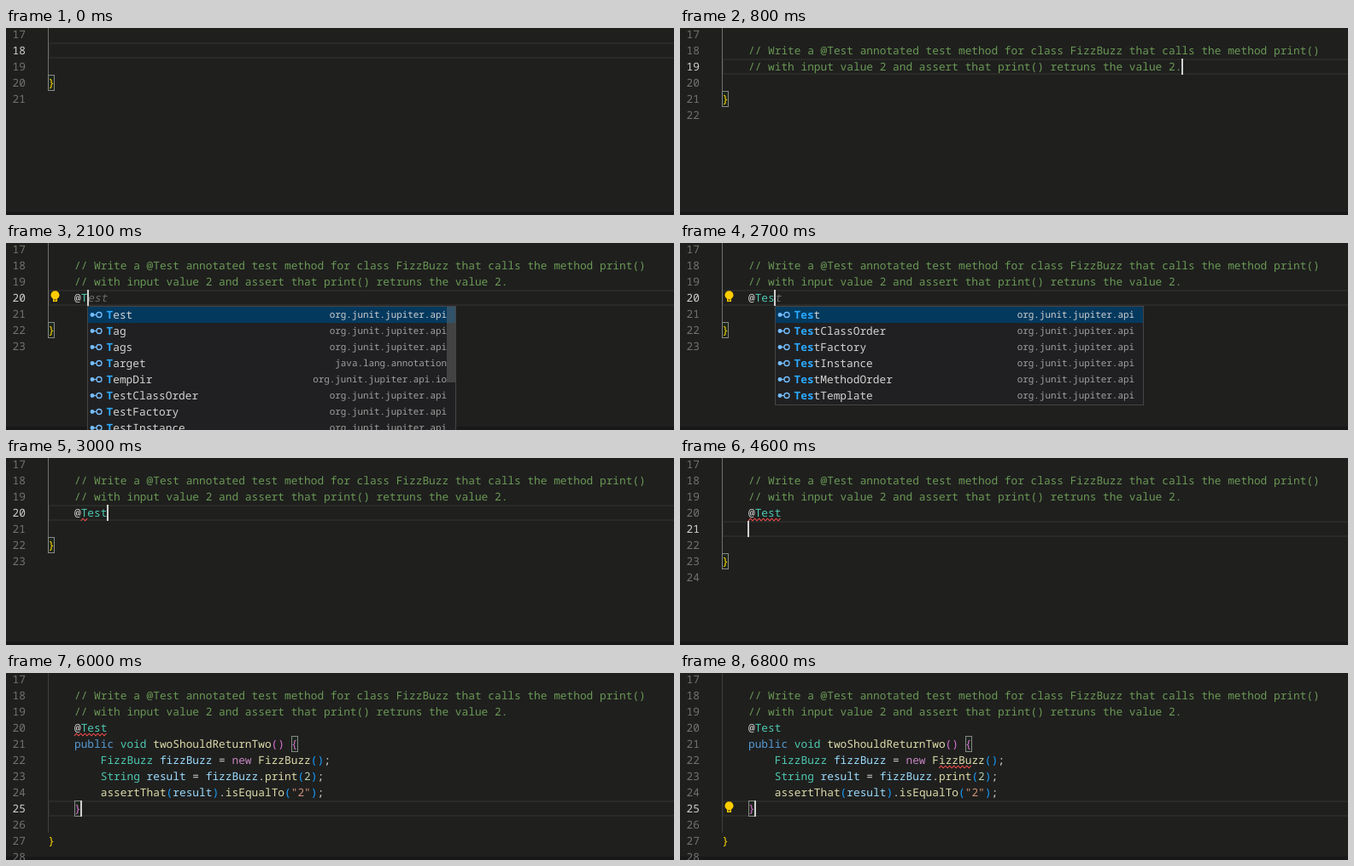
Animation, 782 px wide and 220 px high, one loop 6.9 s. Source, as an HTML page:

```html
<!DOCTYPE html>
<html lang="en">
<head>
<meta charset="utf-8">
<title>Code editor</title>
<style>
html, body { margin: 0; width: 100%; height: 100%; overflow: hidden; background: #1f1f1e; }
svg { display: block; width: 782px; height: 220px; }
text {
  font: 12.828px "Noto Sans Mono", "DejaVu Sans Mono", monospace;
  white-space: pre;
  text-rendering: geometricPrecision;
  fill: #d4d4d4;
}
.num { fill: #6e7681; fill: #72726f; text-anchor: end; }
.num.on { fill: #d0d0d0; }
.c { fill: #6a9955; }
.t { fill: #4ec9b0; }
.k { fill: #569cd6; }
.n { fill: #c586c0; }
.f { fill: #dcdcaa; }
.v { fill: #9cdcfe; }
.d { fill: #b5cea8; }
.s { fill: #ce9178; }
.y { fill: #ffd700; }
.p { fill: #da70d6; }
.b { fill: #179fff; }
.g { fill: #6c6c6a; font-style: italic; }
.hit { fill: #2aaaff; font-weight: bold; }
.pkg { font-size: 10.9px; fill: #a0a0a0; text-anchor: end; }
.pkg.on { fill: #d0d0d0; }
.wave { fill: none; stroke: #f14c4c; stroke-width: 1.1; }
</style>
</head>
<body>
<svg id="stage" viewBox="0 0 782 220"></svg>
<script>
const LOOP = 6900, ROW = 19, CHAR = 7.697;
const stage = document.getElementById("stage");
const colX = col => 49.2 + col * CHAR;
const rowY = row => 17 + row * ROW;          // row 0 is line 18

// Code markup: runs split by "|", the first letter of a run is its colour class.
const paint = code => code.split("|")
  .map(run => `<tspan class="${run[0]}">${run.slice(1)}</tspan>`).join("");
const rect = (x, y, w, h, style) =>
  `<rect x="${x}" y="${y}" width="${w}" height="${h}" ${style}/>`;
const text = (x, y, body, cls = "") => `<text x="${x}" y="${y}" class="${cls}">${body}</text>`;

const comments = [
  "c    // Write a @Test annotated test method for class FizzBuzz that calls the method print()",
  "c    // with input value 2 and assert that print() retruns the value 2."
];
const tag = name => "w    @|t" + name;
const method = [
  "k    public |tvoid |ftwoShouldReturnTwo|p() {",
  "t        FizzBuzz |vfizzBuzz |w= |nnew |fFizzBuzz|b()|w;",
  "t        String |vresult |w= |vfizzBuzz|w.|fprint|b(|d2|b)|w;",
  "f        assertThat|b(|vresult|b)|w.|fisEqualTo|b(|s\"2\"|b)|w;",
  "p    }"
];
const plain = line => line.split("|").map(run => run.slice(1)).join("");
const ghost = method.map(line => "g" + plain(line));
const flat = method.map(line => "w" + plain(line));
const body = (...lines) => [...comments, ...lines, ""];

const api = "org.junit.jupiter.api";
const inApi = names => names.split(" ").map(name => [name, api]);
const general = inApi("AfterAll AfterEach BeforeAll BeforeEach Disabled DisplayName Nested Order");
const tNames = [
  ...inApi("Test Tag Tags"),
  ["Target", "java.lang.annotation"],
  ["TempDir", api + ".io"],
  ...inApi("TestClassOrder TestFactory TestInstance TestMethodOrder TestTemplate")
];
const popup = (col, typed) => ({
  col, typed, items: typed ? tNames.filter(([name]) => name.startsWith(typed)) : general
});

// Each step changes part of the editor state from its time on.
const steps = [
  [0, { lines: ["", ""], row: 0, col: 4, cursor: false, bulb: null, popup: null, wave: null, done: false }],
  [400, { cursor: true }],
  [800, { lines: [...comments, ""], row: 1, col: 70 }],
  [1000, { bulb: 1 }],
  [1100, { cursor: false }],
  [1300, { lines: body(""), row: 2, col: 4, cursor: true }],
  [1500, { bulb: null }],
  [1700, { lines: body("w    @|gTest"), col: 5 }],
  [1800, { popup: popup(5, "") }],
  [2000, { lines: body("w    @|tT|gest"), col: 6, popup: popup(6, "T") }],
  [2100, { bulb: 2 }],
  [2600, { lines: body("w    @|tTe|gst"), col: 7, popup: popup(7, "Te") }],
  [2700, { lines: body("w    @|tTes|gt"), col: 8, popup: popup(8, "Tes") }],
  [2800, { lines: body(tag("Test")), col: 9, popup: popup(8, "Test") }],
  [3000, { popup: null, bulb: null, wave: [2, 5, 6] }],
  [3300, { bulb: 2 }],
  [3500, { lines: body(tag("Test"), ""), row: 3, col: 4 }],
  [3800, { bulb: null }],
  [4000, { wave: [2, 4, 9], cursor: false }],
  [4500, { cursor: true }],
  [4700, { lines: body(tag("Test"), ...ghost) }],
  [5000, { cursor: false }],
  [5500, { cursor: true }],
  [5800, { lines: body(tag("Test"), ...flat), row: 7, col: 5, done: true }],
  [5900, { lines: body(tag("Test"), ...method) }],
  [6100, { bulb: 7 }],
  [6200, { wave: [4, 33, 38] }],
  [6300, { cursor: false }],
  [6800, { cursor: true }]
];
let current = {};
const states = steps.map(([, change]) => current = { ...current, ...change });

function drawBulb(row) {
  const y = rowY(row);
  return `<circle cx="57.5" cy="${y + 6.2}" r="5" fill="#ffcc00"/>` +
    rect(55, y + 9, 5, 5, 'fill="#ffcc00"') + rect(56, y + 11.5, 3, 1, 'fill="#1f1f1e"');
}

function drawWave([row, from, to]) {
  const y = rowY(row) + 17.5, end = colX(to);
  let path = "";
  for (let x = colX(from), i = 0; x <= end; x += 2.5, i++)
    path += `${i ? "L" : "M"}${x} ${y + (i % 2 ? -1.3 : 1.3)}`;
  return `<path class="wave" d="${path}"/>`;
}

function drawPopup({ col, typed, items }) {
  const x = Math.round(colX(col)), top = 74, height = Math.min(items.length, 12) * ROW + 2;
  let out = rect(x + .5, top + .5, 431, height, 'fill="#202022" stroke="#454545"') +
    rect(x + 1, top + 1, 430, ROW, 'fill="#04395e"');
  items.forEach(([name, pkg], i) => {
    const y = top + 1 + i * ROW, mid = y + 9.5;
    out += `<g fill="none" stroke="#75beff" stroke-width="1.3">` +
      `<circle cx="${x + 6}" cy="${mid}" r="1.8" fill="#75beff"/>` +
      `<path d="M${x + 7} ${mid}h4"/><circle cx="${x + 14}" cy="${mid}" r="3"/></g>` +
      text(x + 22.5, y + 14, `<tspan class="hit">${typed}</tspan>${name.slice(typed.length)}`) +
      text(x + 421, y + 13, pkg, i ? "pkg" : "pkg on");
  });
  if (typed.length < 2) out += rect(x + 421, top + 1, 10, 89, 'fill="#79797966"');
  return out;
}

function render(s) {
  const braceRow = s.lines.length;
  const box = (row, col) => rect(Math.round(colX(col)) + .5, rowY(row) + .5, 7, 18,
    'fill="#0064001a" stroke="#888"');
  let out = rect(0, 0, 782, 220, 'fill="#1f1f1e"') + rect(0, 216, 782, 4, 'fill="#191818"') +
    rect(50, rowY(s.row) + 1, 800, 17, 'fill="none" stroke="#2a2a29" stroke-width="2"') +
    rect(49, 0, 1, rowY(braceRow), `fill="${s.done ? "#404040" : "#707070"}"`);
  out += s.done ? box(3, 37) + box(7, 4) : box(braceRow, 0);

  let number = 17;
  out += text(23, rowY(-1) + 14, number, "num");
  [...s.lines, "y}", ""].forEach((line, row) => {
    const y = rowY(row) + 14;
    const continued = line[0] === "g" && row !== s.row;
    if (!continued) out += text(23, y, ++number, row === s.row ? "num on" : "num");
    if (line) out += text(49.2, y, paint(line));
  });

  if (s.wave) out += drawWave(s.wave);
  if (s.bulb !== null) out += drawBulb(s.bulb);
  if (s.cursor) out += rect(Math.round(colX(s.col) - .7), rowY(s.row), 2, ROW, 'fill="#d0d0d0"');
  if (s.popup) out += drawPopup(s.popup);
  stage.innerHTML = out;
}

const start = performance.now();
let shown = -1;
function tick() {
  const time = (performance.now() - start) % LOOP;
  const index = steps.findLastIndex(([at]) => time >= at);
  if (index !== shown) render(states[shown = index]);
  requestAnimationFrame(tick);
}
tick();
</script>
</body>
</html>
```
